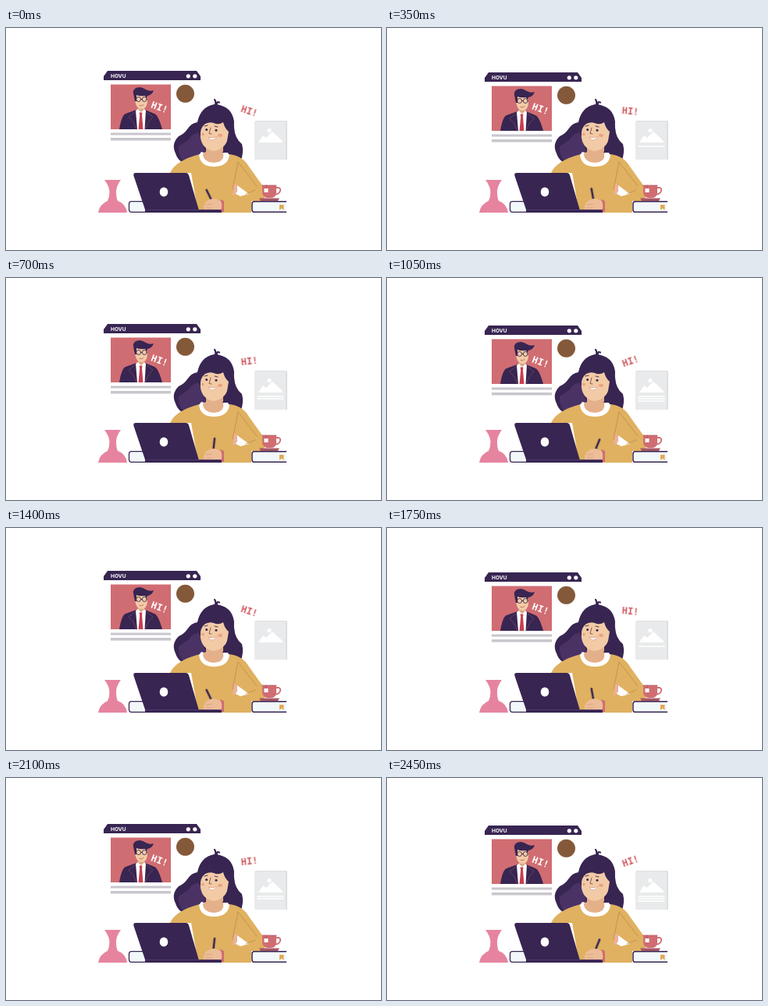
Animation of 480x285 px, one loop 2.8 s. Source, as an HTML page:

```html
<!DOCTYPE html>
<html lang="en">
<head>
<meta charset="utf-8">
<title>Video call</title>
<style>
  html, body { margin: 0; width: 100%; height: 100%; overflow: hidden; background: #fff; }
  svg { display: block; width: 100%; height: 100%; }
  .ink { fill: #382552; }
  .skin { fill: #f2cba6; }
  .rose { fill: #d06d72; }
  .mustard { fill: #e0b160; }
  .line { fill: none; stroke-linecap: round; stroke-linejoin: round; }
  .hi { font: bold 12px "DejaVu Sans Mono", monospace; text-anchor: middle; }
  .window, .wave, .pen, .cover { animation: 1400ms steps(4, end) infinite; }
  .window { animation-name: drop; }
  .wave { animation-name: wave; transform-origin: 311.5px 106.5px; }
  .pen { animation-name: write; transform-origin: 265px 225px; }
  .cover { animation-name: reveal; }
  @keyframes drop { to { transform: translateY(8px); } }
  @keyframes wave { from { transform: rotate(18deg); } to { transform: rotate(-32deg); } }
  @keyframes write { from { transform: rotate(-26deg); } to { transform: rotate(38deg); } }
  @keyframes reveal { to { transform: translateY(12px); } }
</style>
</head>
<body>
<svg viewBox="0 0 480 285">
  <!-- call window -->
  <g class="window">
    <path class="ink" d="M125 67V62L130 55H244L249 62V67Z"/>
    <text x="134" y="64.2" fill="#fff" font-family="Inter, sans-serif" font-weight="700" font-size="6.6">HOVU</text>
    <circle cx="233.3" cy="61.8" r="2.6" fill="#fff"/>
    <circle cx="241.8" cy="61.8" r="2.6" fill="#fff"/>
    <path class="rose" d="M134 72.500H211V130H134Z"/>
    <path class="ink" d="M145 130Q148 112 153 110L167 105H178L190 110Q195 112 200 130Z"/>
    <path fill="#fff" d="M166 106L170 103H176L179 106L177.500 130H168Z"/>
    <path fill="#c83f50" d="M170.500 108.500H174.500L174 112L175.500 130H169.500L171.200 112Z"/>
    <path class="line" stroke="#75505e" stroke-width=".7" d="M165 108L157 114L163 121L167 130M180 108L188 114L182 121L178 130"/>
    <path fill="#d9a983" d="M169.500 99H176.500V105L173 108L169.500 105Z"/>
    <path class="skin" d="M165 84H181V95Q180 104 173.500 104Q167 104 165.500 95Z"/>
    <path class="ink" d="M165 94L163 84Q162 76 172 76Q176 77 179 79Q184 82 189 80Q187 86 181 87L180 91L178 87Q171 88 167 86L167 94Z"/>
    <g class="line" stroke="#3f294c" stroke-width=".9">
      <circle cx="169.700" cy="91.500" r="3"/>
      <circle cx="177.300" cy="91.500" r="3"/>
      <path d="M172.800 91.500H174.200M166.600 91L164.500 90"/>
    </g>
    <path class="line" stroke="#a94e52" stroke-width=".7" d="M171 99.500Q174 101 176 98.500"/>
    <text class="hi" x="196.500" y="106" fill="#fff" transform="rotate(20 196.500 101.700)">HI!</text>
    <path fill="#c9c6cd" d="M134 134.500H211V137.500H134ZM134 141H211V144.500H134Z"/>
    <circle cx="229.500" cy="84.300" r="11.500" fill="#84593a"/>
  </g>

  <!-- picture card -->
  <path fill="#dedfe0" d="M319 119H359Q360 119 360 121V169H319Z"/>
  <path fill="#e9eaeb" d="M319 120H358V169H319Q318 169 318 168V121Q318 120 319 120Z"/>
  <path fill="#fff" d="M323 147L329 138L333 141L341 133L354 145V147Z"/>
  <circle cx="337" cy="131.500" r="2.600" fill="#fff"/>
  <path class="line" stroke="#fff" stroke-width="1.300" d="M322 152H355M322 155H355M322 158H355"/>
  <rect class="cover" x="319" y="150" width="38" height="9.500" fill="#e9eaeb"/>

  <text class="hi wave" x="311.500" y="110.800" fill="#cf5c63">HI!</text>

  <!-- vase and books -->
  <path fill="#e6849f" d="M126 195H147Q141 203 141 210Q141 218 143 222Q153 225 155 237H118Q120 226 130 222Q132.500 217 132.500 210Q132 203 126 195Z"/>
  <path fill="#f2f8fa" stroke="#382552" stroke-width="1.300" d="M182 222.700H160Q157.500 223 157.500 226V233Q157.500 236 160 236.400H182Z"/>

  <!-- woman -->
  <path class="ink" d="M267 98Q249 101 245 121Q237 122 232 130Q228 136 221 139Q211 149 217 161Q219 168 225 172H300Q305 160 302 149Q293 142 292 128Q291 103 267 98Z"/>
  <path fill="#4a3265" d="M248 134Q238 135 234 143Q227 148 221 152Q220 163 227 171L257 165Z"/>
  <path class="mustard" d="M210 186Q217 170 248 162Q266 172 286 162Q303 164 311 178L331 206V222H314V237H246L237 186Z"/>
  <path fill="#fff" d="M296 202L311 213L300 216L294 213Z"/>
  <path fill="#edb09b" d="M292 199L296 202V210L290 216Z"/>
  <path class="line" stroke="#b98d4e" stroke-width=".8" d="M297 172L290 207M297 172L321 203M307 213L319 208"/>
  <path fill="#fff" d="M250 159Q266 165 283 159L286 163Q284 178 266 178Q249 178 247 163Z"/>
  <path fill="#e4b08a" d="M256 151H278V161Q280 172 266 173Q252 172 252 161L256 159Z"/>
  <path class="skin" d="M248 120H285V140Q281 156 265 158Q251 155 249 141Z"/>
  <path class="ink" d="M268 98Q246 101 244 130L249 139Q248 128 255 123Q261 120 266 122Q272 125 278 121Q280 129 285 133L283 145Q280 155 277 160H290L292 120Q289 100 268 98Z"/>
  <path class="line" stroke="#382552" stroke-width="2.200" d="M268 99Q269 94 267 92M270 99Q269 94 273 95.500"/>
  <circle class="ink" cx="256.700" cy="130.500" r="1.500"/>
  <circle class="ink" cx="269" cy="131.300" r="1.500"/>
  <path class="line" stroke="#382552" stroke-width=".9" d="M254 126L258 125M267 126L271 127"/>
  <path class="line" stroke="#84534b" stroke-width=".9" d="M262 128L260 135.500L263 136"/>
  <ellipse cx="274" cy="137.700" rx="3" ry="2" fill="#eaa286"/>
  <ellipse cx="252" cy="136.500" rx="2" ry="1.800" fill="#eaa286"/>
  <path fill="#fff" stroke="#c86558" stroke-width=".4" d="M259 140Q264 142 269.500 139.500Q266 145 262 143.500Z"/>

  <!-- writing hand -->
  <path class="rose" d="M274 220L279 222V236H273Z"/>
  <path class="line pen" stroke="#382552" stroke-width="2.600" d="M265 206V225"/>
  <path fill="#edbd98" d="M255 224Q260 219 267 219L275 222Q278 230 274 236H257Q252 233 253 229Z"/>
  <path class="line" stroke="#d39a78" stroke-width=".7" d="M256 227L264 226M256 231H264"/>

  <!-- laptop -->
  <path class="ink" d="M178 233H274Q276 233 276 235V237H178Z"/>
  <path class="ink" d="M166 186H230Q233 186 234 189L247.500 236H179L163.500 190Q162.500 186 166 186Z"/>
  <path class="line" stroke="#5c4877" stroke-width=".6" d="M179 233.500H275"/>
  <ellipse cx="202" cy="210.500" rx="5.300" ry="6" fill="#fff"/>

  <!-- cup on book -->
  <path fill="#f2f8fa" d="M316 222H359V237H316Z"/>
  <path class="line" stroke="#382552" stroke-width="1.500" d="M358.500 222.700H317Q315 223 315 226V233Q315 236 317 236.300H358.500"/>
  <path fill="#e2a84f" d="M350 227H355.500V234L352.700 231.500L350 234Z"/>
  <path fill="#a85765" d="M324 218.500H350L348 222H326Z"/>
  <path class="rose" d="M328 202H346V212Q345 218 339 218H334Q329 217 328 212Z"/>
  <path class="line" stroke="#d06d72" stroke-width="1.800" d="M346 205H349Q352 206 351 209Q350 213 345 213.500"/>
  <path class="line" stroke="#b45661" stroke-width=".8" d="M328 202H346M333 202V206"/>
  <path fill="#fff" d="M330.500 206H335.500V211H330.500Z"/>
</svg>
</body>
</html>
```
